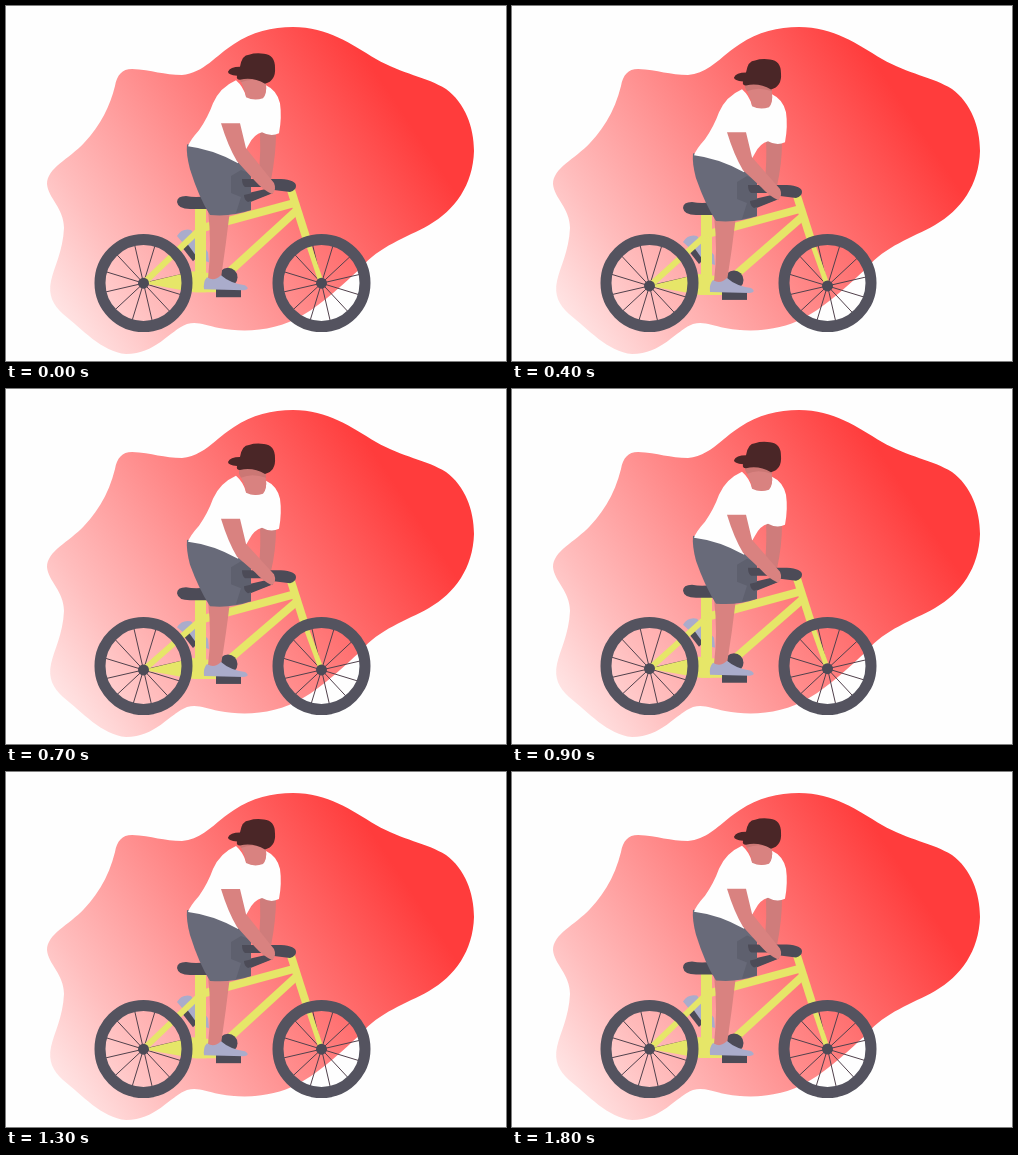
Write an HTML page that moves like this. It is 500 by 355 pixels and loops after 1900 ms.

```html
<!DOCTYPE html>
<html lang="en">
<head>
<meta charset="utf-8">
<title>Cyclist</title>
<style>
html, body { margin: 0; width: 100%; height: 100%; overflow: hidden; background: #fefefe; }
svg { display: block; width: 500px; height: 355px; }
.dark { fill: #4c4b57; }
.skin { fill: #d98280; }
.shoe { fill: #aaaccb; }
.tube { fill: none; stroke: #e6e668; }
.ring { fill: none; stroke: #54535f; stroke-width: 11; }
.spokes { stroke: #51414c; stroke-width: 1; }
</style>
</head>
<body>
<svg viewBox="0 0 500 355">
  <defs>
    <linearGradient id="red" gradientUnits="userSpaceOnUse" x1="60" y1="320" x2="392" y2="99">
      <stop offset="0" stop-color="#ffe4e4"/>
      <stop offset=".2" stop-color="#ffbebe"/>
      <stop offset=".5" stop-color="#ff8d8d"/>
      <stop offset=".8" stop-color="#ff5d5d"/>
      <stop offset="1" stop-color="#ff3c3c"/>
    </linearGradient>
  </defs>

  <path fill="url(#red)" d="M287 21C322 21 345 38 370 53C396 68 421 71 440 83C459 97 468 121 468 145C467 179 449 204 423 219C400 232 373 240 355 262C337 278 318 297 297 309C271 325 239 327 213 322C199 319 191 315 181 318C163 325 150 348 120 348C96 346 76 323 57 308C47 299 42 289 45 275C48 261 57 245 58 222C58 202 42 192 41 178C41 162 63 153 78 137C95 119 104 100 109 80C111 69 116 63 126 63C146 64 158 69 176 69C198 67 210 49 228 38C246 26 266 21 287 21Z"/>

  <g data-move="l" class="spokes"></g>

  <!-- In data-d, a letter after a y value names the part that the point follows. -->
  <path class="shoe" data-d="M171 230uQ176 222u 185 224uL202 246l 203 256lQ190 253l 184 245lZ"/>
  <path class="dark" data-d="M176 241lL181 237lL191 251lL187 255lZ"/>
  <path class="dark" data-move="u" d="M238 188L264 182L267 187L242 197Q238 195 238 188Z"/>
  <path fill="#cf7c7b" data-d="M254 124tL270 127tQ270 148t 265 174uL253 167uQ255 145t 254 124tZ"/>

  <g class="tube">
    <path stroke-width="11" data-d="M194.5 202uL194.5 286l"/>
    <path stroke-width="6" data-d="M193 224uL137.5 277l"/>
    <path stroke-width="8" data-d="M285 184uL300 231u"/>
    <path stroke-width="5" data-d="M298 225uL315.5 277l"/>
    <path stroke-width="8" data-d="M290 205uL212 276l"/>
    <path stroke-width="8" data-d="M196 222uL288 197u"/>
  </g>

  <g data-move="l">
    <path fill="#e6e668" d="M137 277L187 265L205 267L211 286H188Z"/>
    <circle class="dark" cx="222" cy="271" r="9.5"/>
    <rect class="dark" x="210" y="282" width="25" height="9"/>
  </g>

  <circle class="ring" cx="137.5" cy="277" r="43.5"/>
  <circle class="ring" cx="315.5" cy="277" r="43.5"/>
  <g data-move="l" class="dark">
    <circle cx="137.5" cy="277" r="5.5"/>
    <circle cx="315.5" cy="277" r="5.5"/>
  </g>

  <path class="skin" data-d="M202 204uL224 204uQ220 238u 215 272lQ208 276l 202 272lQ206 238u 202 204uZ"/>
  <path class="shoe" data-move="l" d="M198 283Q197 275 201 271Q208 276 215 269Q224 277 239 279Q245 283 238 284Z"/>

  <path class="dark" data-move="u" d="M171 196Q171 190 180 190Q190 192 201 190V203H184Q172 203 171 196Z"/>
  <path fill="#686a79" data-d="M181 138tQ208 142t 232 155tL245 167uL245 204uQ226 211u 204 209uQ193 192u 184 163tQ180 148t 181 138tZ"/>
  <g data-move="u">
    <path fill="#5e606e" d="M245 168V204L230 207L235 191L225 187V170L235 164Z"/>
    <path class="dark" d="M236 173H275Q290 174 290 180Q290 184 284 186L268 184L261 181H239Q236 179 236 173Z"/>
    <path class="dark" d="M238 189L264 183L266 187L242 196Q238 194 238 189Z"/>
  </g>

  <g data-move="t">
    <path fill="#fefefe" d="M230 74Q237 80 240 90Q248 95 257 91Q261 85 260 79Q271 84 274 97Q276 111 273 127Q265 131 256 126Q248 128 243 138L232 157Q207 143 182 140Q184 134 193 124Q202 111 207 97Q214 81 230 74Z"/>
    <path class="skin" d="M233 66H259L260 78Q261 88 257 92Q248 95 240 91Q239 82 233 72Z"/>
    <path fill="#cb7774" d="M233 66H259L260 76Q246 71 235 76L233 72Z"/>
  </g>
  <path class="skin" data-d="M215 117tL234 117tL240 142tL268 177uQ271 184u 266 188uQ257 184u 249 175uL231 155tQ222 140t 215 117tZ"/>
  <path fill="#4a2627" data-move="c" d="M222 66Q224 61 234 61Q236 49 243 49Q249 47 258 48Q269 49 269 62Q270 75 259 78Q247 71 234 74Q230 74 231 70Q222 69 222 66Z"/>
</svg>
<script>
const LOOP = 1900, STEP = 100, SPOKES = 12;
const bent = document.querySelectorAll('[data-d]');
const moved = document.querySelectorAll('[data-move]');

const spokes = document.querySelector('.spokes');
for (const cx of [137.5, 315.5])
  for (let i = 0; i < SPOKES; i++) {
    const line = document.createElementNS('http://www.w3.org/2000/svg', 'line');
    const a = (i / SPOKES * 360 - 13) * Math.PI / 180;
    const ends = { x1: cx, y1: 277, x2: cx + 43 * Math.cos(a), y2: 277 + 43 * Math.sin(a) };
    for (const k in ends) line.setAttribute(k, ends[k]);
    spokes.append(line);
  }

// Drop of each part: cap, torso, upper bike, lower bike.
function drops(t) {
  const k = (1 + Math.cos((t - 640) / LOOP * 2 * Math.PI)) / 2;
  const q = k * k;
  return { c: 9 * k ** 1.2 - 2, t: 13.5 * q - .5, u: 9 * q - .5, l: 4 * q };
}

function draw(now) {
  const drop = drops(Math.floor(now % LOOP / STEP) * STEP);
  for (const el of moved)
    el.setAttribute('transform', `translate(0 ${drop[el.dataset.move]})`);
  for (const el of bent)
    el.setAttribute('d', el.dataset.d.replace(/(\d+)([tul])/g, (_, y, part) => +y + drop[part]));
}

let start;
function tick(now) {
  start ??= now;
  draw(now - start);
  requestAnimationFrame(tick);
}
draw(0);
requestAnimationFrame(tick);
</script>
</body>
</html>
```
